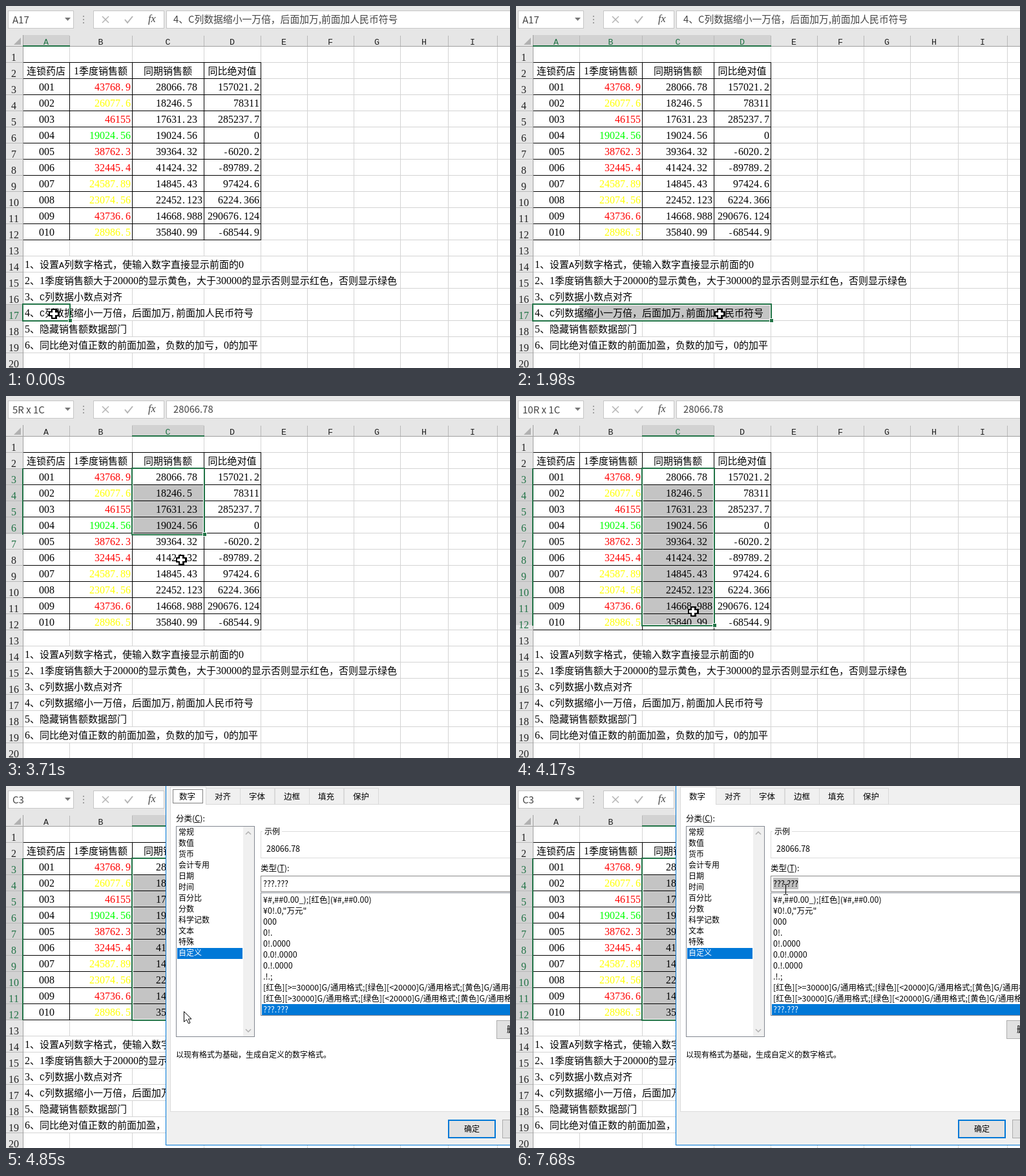
Recreate the animation shown at these times as an HTML page with a canvas. Size 780x561 px, loop 8 s.

```html
<!DOCTYPE html>
<html lang="zh-CN">
<head>
<meta charset="utf-8">
<style>
  html, body { margin: 0; width: 100%; height: 100%; overflow: hidden; background: #fff; }
  canvas { display: block; }
</style>
</head>
<body>
<canvas id="stage" width="780" height="561"></canvas>
<script>
const LOOP = 8000, W = 780, H = 561;
const UI = '"Noto Sans CJK SC", "Noto Sans CJK", "Noto Sans", sans-serif';
const GREEN = '#217346', BLUE = '#0078d7', GRID = '#d4d4d4';
const DIALOG_TOP = 20, DIALOG_OPENS = 4500, JUMP = 3100;
const stage = document.getElementById('stage').getContext('2d');
const dialogLayer = document.createElement('canvas');
dialogLayer.width = 830;
dialogLayer.height = 600;
const layer = dialogLayer.getContext('2d');
let g = stage;

const cols = [26, 98, 195, 306, 394, 466, 538, 610, 684, 760, 832];
const rowTop = row => 62 + 25 * (row - 1);
const titles = ['连锁药店', '1季度销售额', '同期销售额', '同比绝对值'];
const data = `43768.9 28066.78 157021.2
26077.6 18246.5 78311
46155 17631.23 285237.7
19024.56 19024.56 0
38762.3 39364.32 -6020.2
32445.4 41424.32 -89789.2
24587.89 14845.43 97424.6
23074.56 22452.123 6224.366
43736.6 14668.988 290676.124
28986.5 35840.99 -68544.9`.split('\n').map(line => line.split(' '));
const notes = [
  '1、设置A列数字格式，使输入数字直接显示前面的0',
  '2、1季度销售额大于20000的显示黄色，大于30000的显示否则显示红色，否则显示绿色',
  '3、C列数据小数点对齐',
  '4、C列数据缩小一万倍，后面加万,前面加人民币符号',
  '5、隐藏销售额数据部门',
  '6、同比绝对值正数的前面加盈，负数的加亏，0的加平'
];
const categories = ['常规', '数值', '货币', '会计专用', '日期', '时间', '百分比', '分数',
  '科学记数', '文本', '特殊', '自定义'];
const formats = ['¥#,##0.00_);[红色](¥#,##0.00)', '¥0!.0,"万元"', '000', '0!.', '0!.0000',
  '0.0!.0000', '0.!.0000', '.!.;',
  '[红色][>=30000]G/通用格式;[绿色][<20000]G/通用格式;[黄色]G/通用格式',
  '[红色][>30000]G/通用格式;[绿色][<20000]G/通用格式;[黄色]G/通用格式', '???.???'];

const mix = (a, b, p) => a + (b - a) * p;
const span = (t, from, to) => Math.min(1, Math.max(0, (t - from) / (to - from)));
const easeOut = p => p * (2 - p);
const smooth = p => p * p * (3 - 2 * p);

// Pointer moves: start, end, destination.
const moves = [
  [80, 320, 114, 484], [320, 540, 86, 479], [940, 1500, 333, 478], [1870, 2200, 300, 476],
  [2420, 3050, 266, 128], [3310, 4480, 275, 349], [5250, 5700, 402, 270],
  [5700, 6040, 340, 258], [6430, 6750, 437, 150], [6750, 6980, 417, 150],
  [7120, 7400, 394, 151], [7400, 7680, 417, 160]
];

function pointerAt(t) {
  let x = 74, y = 477;
  for (const [from, to, toX, toY] of moves) {
    const p = easeOut(span(t, from, to));
    x = mix(x, toX, p);
    y = mix(y, toY, p);
  }
  return { x: Math.round(x), y: Math.round(y) };
}

function selectionAt(t) {
  const across = easeOut(span(t, 940, 1720));
  const down = smooth(span(t, 3350, 4270));
  const jump = easeOut(span(t, JUMP, JUMP + 110));
  const wide = [26, 462, mix(98, 394, across), 487];
  const tall = [195, 112, 306, mix(137, 362, down)];
  const [x0, y0, x1, y1] = wide.map((v, i) => Math.round(mix(v, tall[i], jump)));
  const columns = cols.filter(x => x < x1 && x >= x0).length;
  return { x0, y0, x1, y1, columns, rows: 1 + Math.ceil(9 * down) };
}

function box(x, y, w, h, fill, border, line = 1) {
  if (fill) { g.fillStyle = fill; g.fillRect(x, y, w, h); }
  if (border) {
    g.strokeStyle = border;
    g.lineWidth = line;
    g.strokeRect(x + line / 2, y + line / 2, w - line, h - line);
  }
}

function path(points, stroke, fill, width = 1) {
  g.beginPath();
  points.forEach(([x, y]) => g.lineTo(x, y));
  if (fill) { g.closePath(); g.fillStyle = fill; g.fill(); }
  if (stroke) { g.strokeStyle = stroke; g.lineWidth = width; g.stroke(); }
}

function label(s, x, middle, size = 12, color = '#000') {
  g.font = `${size}px ${UI}`;
  g.textAlign = 'left';
  g.fillStyle = color;
  g.fillText(s, x, middle + size * .37);
}

// Fixed-pitch cell text: 8 px for Latin, 15 px for Chinese.
const pitch = ch => ch < '\x7f' ? 8 : 15;
const cellWidth = s => [...s].reduce((sum, ch) => sum + pitch(ch), 0);

function cellText(s, x, middle, align = 0, color = '#000') {
  x -= cellWidth(s) * align;
  g.fillStyle = color;
  g.textAlign = 'left';
  for (const ch of s) {
    g.font = /[A-Z-]/.test(ch) ? '13.33px "Liberation Mono", monospace'
      : pitch(ch) === 8 ? '16px "Liberation Serif", serif' : `15px ${UI}`;
    g.fillText(ch, x + (/[.,]/.test(ch) ? 1 : 0), middle + 5.3);
    x += pitch(ch);
  }
}

function drawToolbar(name, formula) {
  box(0, 0, W, 62, '#e6e6e6');
  for (const [x, w] of [[3, 102], [135, 110], [248, 600]]) box(x, 7, w, 28, '#fff', '#c6c6c6');
  label(name, 10, 21, 15, '#444');
  label(formula, 259, 21, 14.8, '#444');
  path([[91, 18], [100, 18], [95.5, 23]], null, '#777');
  for (const y of [15, 20, 25]) box(119, y, 2, 2, '#a0a0a0');
  path([[149, 16], [159, 26]], '#b4b4b4', null, 1.5);
  path([[159, 16], [149, 26]], '#b4b4b4', null, 1.5);
  path([[184, 21], [188, 26], [196, 16]], '#b4b4b4', null, 2);
  g.font = 'italic 16px "Liberation Serif", serif';
  g.textAlign = 'left';
  g.fillStyle = '#444';
  g.fillText('fx', 220, 25);
}

function drawHeaders({ x0, y0, x1, y1 }) {
  box(0, 62, 26, H, '#e6e6e6');
  box(x0, 45, x1 - x0, 17, '#d2d2d2');
  box(0, y0, 26, y1 - y0, '#d2d2d2');
  path([[23, 49], [23, 60], [12, 60]], null, '#b1b1b1');
  box(0, 62, W, 1, '#9f9f9f');
  box(26, 45, 1, H, '#9f9f9f');
  for (let i = 0; i < 10; i++) {
    const active = cols[i] < x1 && cols[i + 1] > x0;
    box(cols[i + 1], 46, 1, 16, '#b8b8b8');
    cellText('ABCDEFGHIJ'[i], (cols[i] + cols[i + 1]) / 2, 55, .5, active ? GREEN : '#222');
  }
  for (let row = 1; row <= 20; row++) {
    const top = rowTop(row), active = top < y1 && top + 25 > y0;
    box(0, top + 25, 26, 1, '#b8b8b8');
    cellText(String(row), 12, top + 18, .5, active ? GREEN : '#222');
  }
  box(x0, 61, x1 - x0 + 1, 2, GREEN);
  box(25, y0, 2, y1 - y0 + 1, GREEN);
}

function drawCells() {
  box(26, 62, W, H, '#fff');
  for (let row = 1; row <= 20; row++) box(26, rowTop(row) + 25, W, 1, GRID);
  for (const x of cols) box(x, 62, 1, H, GRID);
  notes.forEach((note, i) => {
    const top = rowTop(14 + i), end = 29 + cellWidth(note);
    for (const x of cols.slice(1)) if (x < end) box(x, top + 1, 1, 24, '#fff');
    cellText(note, 29, top + 14);
  });
  titles.forEach((s, i) => cellText(s, (cols[i] + cols[i + 1]) / 2, 101, .5));
  data.forEach(([sales, previous, change], i) => {
    const y = rowTop(i + 3) + 14;
    cellText(String(i + 1).padStart(3, '0'), 63, y, .5);
    cellText(sales, 193, y, 1, sales > 30000 ? '#f00' : sales > 20000 ? '#ff0' : '#0f0');
    cellText(previous, 232, y);
    cellText(change, 392, y, 1);
  });
  for (let row = 2; row <= 13; row++) box(26, rowTop(row), 369, 1, '#000');
  for (const x of cols.slice(0, 5)) box(x, 87, 1, 276, '#000');
}

function drawSelection({ x0, y0, x1, y1, columns, rows }) {
  const shade = 'rgba(0,0,0,.23)';
  if (columns > 1) box(98, y0, x1 - 98, y1 - y0, shade);
  if (rows > 1) box(x0, 137, x1 - x0, Math.max(0, y1 - 137), shade);
  box(x0 + 1, y0 + 1, x1 - x0 - 1, y1 - y0 - 1, null, '#fff');
  box(x0 - 1, y0 - 1, x1 - x0 + 3, y1 - y0 + 3, null, GREEN, 2);
  box(x1 - 2, y1 - 3, 7, 7, '#fff');
  box(x1 - 1, y1 - 2, 5, 5, GREEN);
}

function focusRect(x, y, w, h, color) {
  g.setLineDash([1, 1]);
  box(x, y, w, h, null, color);
  g.setLineDash([]);
}

function drawTabs(focused) {
  ['数字', '对齐', '字体', '边框', '填充', '保护'].forEach((s, i) => {
    const x = i ? Math.round(309 + 53.4 * (i - 1)) : 254;
    if (i) box(x, 3, 54, 26, '#f0f0f0', '#d9d9d9');
    else { box(x, 1, 56, 28, '#fff', '#d9d9d9'); box(x + 1, 27, 54, 3, '#fff'); }
    label(s, x + 14, 16, 12.5);
  });
  if (focused) focusRect(258, 5, 47, 22, '#000');
}

function drawList(items, x, firstY, size, selectedWidth) {
  const last = items.length - 1, step = 17;
  box(x - 2, firstY + step * last - 8, selectedWidth, step, BLUE);
  items.forEach((s, i) => label(s, x, firstY + step * i, size, i === last ? '#fff' : '#000'));
}

function drawDialogContent(t, pointer) {
  box(247, -DIALOG_TOP, 562, 557 + DIALOG_TOP, '#f0f0f0', BLUE);
  box(248, -DIALOG_TOP, 560, DIALOG_TOP, '#f0f0f0');
  box(254, 28, 548, 477, '#fff', '#dcdcdc');
  drawTabs(t < 6150);

  label('分类(C):', 263, 50, 12.5);
  box(292, 56, 8, 1, '#000');
  box(263, 62, 122, 327, '#fff', '#828790');
  box(367, 63, 17, 325, '#f0f0f0');
  path([[371, 75], [375, 71], [379, 75]], '#b0b0b0', null, 1.5);
  path([[371, 377], [375, 381], [379, 377]], '#b0b0b0', null, 1.5);
  drawList(categories, 267, 72, 12, 101);
  if (t >= 6150 && t < 6700) focusRect(265, 251, 101, 17, '#ffb060');

  box(394, 70, 402, 42, null, '#dcdcdc');
  box(397, 64, 30, 14, '#fff');
  label('示例', 400, 71);
  label('28066.78', 403, 97, 12.5);
  label('类型(T):', 394, 127, 12.5);
  box(423, 133, 7, 1, '#000');
  box(394, 139, 402, 25, '#fff', '#8a8a8a');
  if (t > 6750) {
    const left = t < 7400 ? Math.max(398, pointer.x) : 398;
    box(left, 142, 437 - left, 18, '#c0c0c0');
  }
  label('???.???', 398, 151, 12.5);
  box(394, 165, 402, 191, '#fff', '#828790');
  drawList(formats, 398, 176, 12.5, 400);

  box(759, 363, 60, 29, '#e1e1e1', '#adadad');
  label('删除', 775, 378);
  label('以现有格式为基础，生成自定义的数字格式。', 263, 417);
  box(684, 517, 74, 29, '#e1e1e1', BLUE, 2);
  label('确定', 709, 532);
  box(768, 517, 60, 29, '#e1e1e1', '#adadad');
}

function drawDialog(t, pointer) {
  g = layer;
  g.setTransform(1, 0, 0, 1, 0, DIALOG_TOP);
  drawDialogContent(t, pointer);
  g = stage;

  const open = easeOut(span(t, DIALOG_OPENS, DIALOG_OPENS + 280));
  const scale = mix(.95, 1, open), cx = 528, cy = 241;
  g.save();
  g.globalAlpha = open;
  g.translate(cx, cy);
  g.scale(scale, scale);
  g.drawImage(dialogLayer, -cx, -cy - DIALOG_TOP);
  g.restore();
}

function drawPointer(t, { x, y }) {
  g.save();
  g.translate(x, y);
  if (t < DIALOG_OPENS) {
    box(-4, -8, 9, 16, '#000');
    box(-8, -4, 17, 8, '#000');
    box(-2, -6, 4, 12, '#fff');
    box(-6, -2, 12, 4, '#fff');
  } else if (t > 6430 && x >= 394 && y < 164) {
    box(0, -7, 1, 15, '#000');
    for (const side of [-3, 1]) for (const end of [-8, 8]) box(side, end, 3, 1, '#000');
  } else {
    g.translate(.5, .5);
    path([[0, 0], [0, 16], [4, 12.5], [7, 18.5], [9.5, 17.5], [6.8, 11.5], [11.5, 11.5], [0, 0]],
      '#000', '#fff');
  }
  g.restore();
}

function nameBox(t, { columns, rows }) {
  if (t < 1870 && columns > 1) return `1R x ${columns}C`;
  if (t < 4350 && rows > 1) return `${rows}R x 1C`;
  return t < JUMP + 30 ? 'A17' : 'C3';
}

function draw() {
  const t = performance.now() % LOOP;
  const selection = selectionAt(t), pointer = pointerAt(t);
  drawCells();
  drawToolbar(nameBox(t, selection), t < JUMP + 30 ? notes[3] : data[0][1]);
  drawHeaders(selection);
  drawSelection(selection);
  if (t >= DIALOG_OPENS) drawDialog(t, pointer);
  drawPointer(t, pointer);
  requestAnimationFrame(draw);
}
draw();
</script>
</body>
</html>
```
